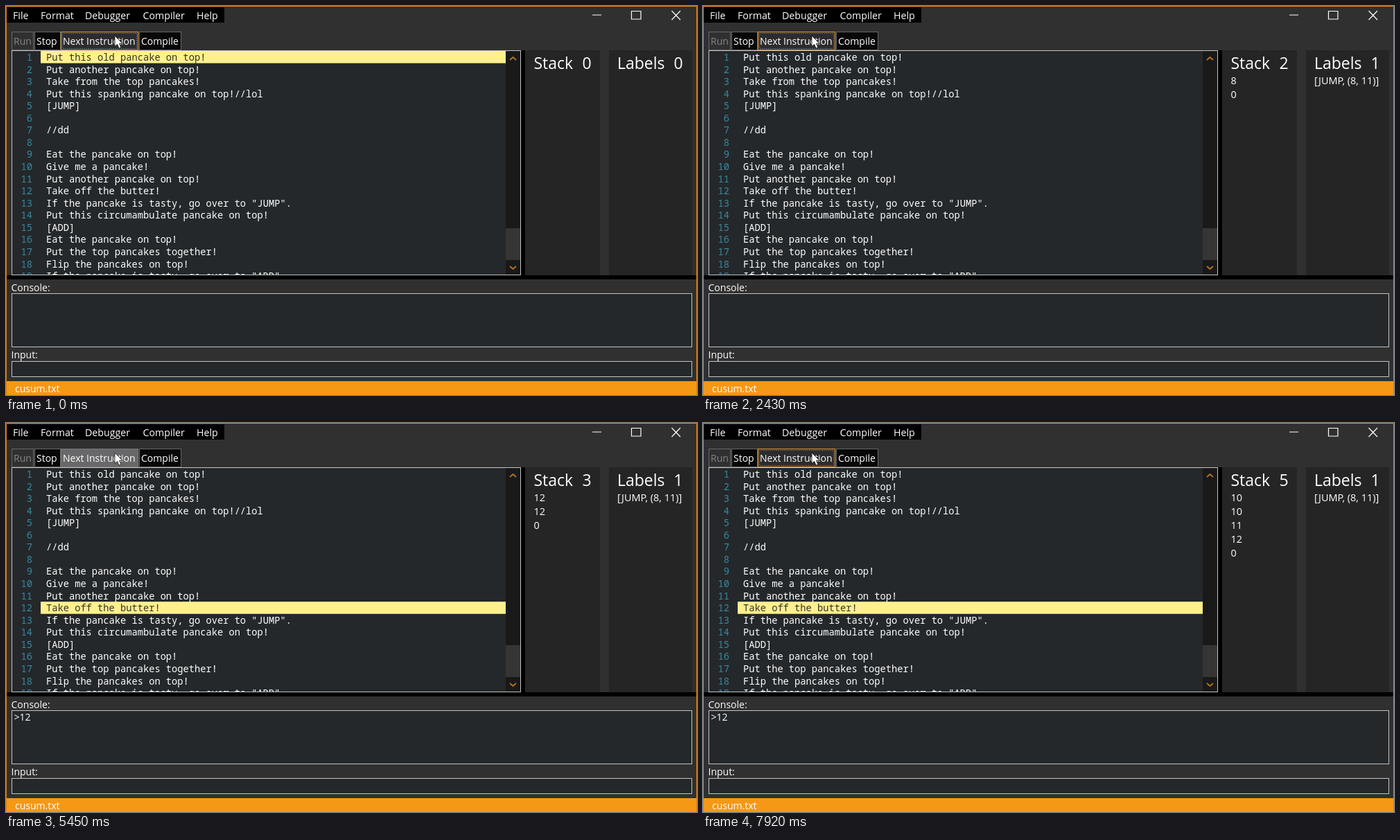
Write an HTML page that moves like this. It is 997 px wide and 562 px high and loops after 8040 ms.

```html
<!DOCTYPE html>
<html lang="en">
<head>
<meta charset="utf-8">
<title>Pancake debugger</title>
<style>
  html, body { margin: 0; width: 100%; height: 100%; overflow: hidden; background: #303030; }
  svg { display: block; width: 997px; height: 562px; }
  text { font: 14px "Open Sans", "Noto Sans", sans-serif; fill: #fff; white-space: pre; }
  .menu text { font-size: 14.2px; }
  .head { font-size: 23px; }
  .label, .wait { font-size: 14.5px; }
  .code text { font: 500 13.72px "Noto Sans Mono", "DejaVu Sans Mono", monospace; }
  .code .num { fill: #3989a0; text-anchor: end; }
  .code .active { fill: #34331f; }
  .box { fill: #24282b; stroke: #c4c4c4; }
  .btn { fill: #080808; stroke: #686868; }
  .orange { fill: #f0951c; }
  .line { fill: none; stroke: #fff; stroke-width: 1.2; }
  .arrow { fill: none; stroke: #b8741d; stroke-width: 1.8; }
</style>
</head>
<body>
<svg viewBox="0 0 997 562">
  <rect width="997" height="562" fill="#303030"/>
  <rect x="1" y="2" width="314" height="22" fill="#000"/>
  <g class="menu">
    <text x="10" y="18.5">File</text>
    <text x="50" y="18.5">Format</text>
    <text x="114" y="18.5">Debugger</text>
    <text x="197.5" y="18.5">Compiler</text>
    <text x="275" y="18.5">Help</text>
  </g>
  <path class="line" d="M846 13H859M902.5 7.5H916V19H902.5ZM960.5 7L973 20M973 7L960.5 20"/>

  <rect class="btn" x="8.5" y="37.5" width="31" height="26" style="fill:#303030"/>
  <rect class="btn" x="41.5" y="37.5" width="37" height="26"/>
  <rect class="btn" x="192.5" y="37.5" width="60" height="26"/>
  <rect id="next" x="79.5" y="37.5" width="111" height="26"/>
  <rect id="focus" x="81.5" y="39.5" width="107" height="22" fill="none" stroke="#aaa" stroke-dasharray="1 2"/>
  <text x="11" y="56" style="fill:#858585">Run</text>
  <text x="44" y="56">Stop</text>
  <text x="82" y="56">Next Instruction</text>
  <text x="195" y="56">Compile</text>

  <rect class="box" x="8.5" y="64.5" width="734" height="324"/>
  <rect id="mark" x="50" width="671" height="17.6" fill="#fff08e"/>
  <clipPath id="view"><rect x="9" y="65" width="733" height="323"/></clipPath>
  <g class="code" id="code" clip-path="url(#view)"></g>
  <rect x="721" y="65" width="21" height="323" fill="#19191a"/>
  <rect x="721" y="321" width="21" height="46" fill="#353536"/>
  <path class="arrow" d="M727 78L731.5 74L736 78M727 376L731.5 380L736 376"/>

  <rect x="743" y="64" width="6" height="325" fill="#000"/>
  <rect x="749" y="64" width="108" height="325" fill="#252525"/>
  <rect x="870" y="64" width="120" height="325" fill="#252525"/>
  <text class="head" x="761.5" y="90.5">Stack</text>
  <text class="head" id="depth" x="831.5" y="90.5"></text>
  <text class="head" x="882" y="90.5">Labels</text>
  <text class="head" id="count" x="963.5" y="90.5"></text>
  <text class="label" id="label" x="882" y="112.5">[JUMP, (8, 11)]</text>
  <g id="stack"></g>

  <rect y="389" width="997" height="6" fill="#000"/>
  <text x="7.5" y="411.5">Console:</text>
  <rect class="box" x="8.5" y="415.5" width="981" height="77"/>
  <text id="output" x="11.5" y="430">&gt;12</text>
  <text x="7.5" y="508.5">Input:</text>
  <text id="wait" class="orange wait" x="58" y="508.5">WAITING FOR INPUT (numeric)</text>
  <rect id="input" class="box" x="8.5" y="513.5" width="981" height="22"/>
  <text id="typed" x="11.5" y="530.5"></text>
  <rect id="caret" y="516" width="1" height="18" fill="#fff"/>

  <rect class="orange" y="542" width="997" height="20" style="fill:#f59815"/>
  <text x="13" y="557.5">cusum.txt</text>
  <path d="M.5 562V.5H996.5V562" fill="none" stroke="#d98516"/>
  <path d="M157 43V58.5L160.6 55.2L163 61L165.8 59.8L163.4 54.2H168Z" fill="#fff" stroke="#111" stroke-width=".8"/>
</svg>
<script>
const LOOP = 8040, PRESS = 130, GAP = 60, TOP = 65, PITCH = 17.56;
const WAIT = 2860, ENTER = 4260, REFOCUS = 5030;
const program = `Put this old pancake on top!
Put another pancake on top!
Take from the top pancakes!
Put this spanking pancake on top!//lol
[JUMP]

//dd

Eat the pancake on top!
Give me a pancake!
Put another pancake on top!
Take off the butter!
If the pancake is tasty, go over to "JUMP".
Put this circumambulate pancake on top!
[ADD]
Eat the pancake on top!
Put the top pancakes together!
Flip the pancakes on top!
If the pancake is tasty, go over to "ADD".`.split('\n');

// Mouse release time, next line, stack from the top down
const steps = [
  [-GAP, 1, ''],
  [390, 2, '3'],
  [780, 3, '3 3'],
  [1170, 4, '0'],
  [1560, 5, '8 0'],
  [1980, 9, '8 0'],
  [2400, 10, '0'],
  [WAIT - GAP, 0, '0'],
  [ENTER - GAP, 11, '12 0'],
  [5160, 12, '12 12 0'],
  [5530, 13, '11 12 0'],
  [5900, 11, '11 12 0'],
  [6280, 12, '11 11 12 0'],
  [6640, 13, '10 11 12 0'],
  [6990, 11, '10 11 12 0'],
  [7320, 12, '10 10 11 12 0']
];
const clicks = steps.map(s => s[0]).filter(t => t > 0 && t !== ENTER - GAP);

const $ = id => document.getElementById(id);
const show = (id, on) => { $(id).style.display = on ? '' : 'none'; };

function addText(parent, x, y, content, cls = '') {
  const el = document.createElementNS('http://www.w3.org/2000/svg', 'text');
  el.setAttribute('x', x);
  el.setAttribute('y', y);
  el.setAttribute('class', cls);
  el.textContent = content;
  parent.append(el);
  return el;
}

const lines = program.map((line, i) => {
  const y = 79 + i * PITCH;
  addText($('code'), 38, y, i + 1, 'num');
  return addText($('code'), 58, y, line);
});
const cells = Array.from({ length: 5 }, (_, i) => addText($('stack'), 761.5, 112.5 + i * 20, '', 'label'));

function draw(t) {
  const [, nextLine, values] = steps.filter(s => s[0] + GAP <= t).pop();
  const stepping = clicks.some(r => t >= r && t < r + GAP);
  const line = stepping ? 0 : nextLine;
  show('mark', line);
  $('mark').setAttribute('y', TOP + (line - 1) * PITCH);
  lines.forEach((el, i) => el.setAttribute('class', i + 1 === line ? 'active' : ''));

  const stack = values ? values.split(' ') : [];
  cells.forEach((el, i) => { el.textContent = stack[i] || ''; });
  $('depth').textContent = stack.length;
  const labelled = t >= 1980 + GAP;
  $('count').textContent = +labelled;
  show('label', labelled);

  const pressed = clicks.some(r => t >= r - PRESS && t < r);
  $('next').style.fill = pressed ? '#68686a' : '#2c2c2e';
  $('next').style.stroke = pressed ? '#777' : '#e29530';
  show('focus', t < WAIT || t >= 6150);

  const editing = t >= WAIT && t < REFOCUS;
  const typed = t < 3480 || t >= ENTER ? '' : t < 3720 ? '1' : '12';
  const lastKey = [WAIT, 3480, 3720, ENTER].filter(k => k <= t).pop() || 0;
  show('wait', t >= WAIT && t < ENTER);
  show('output', t >= ENTER);
  $('input').style.stroke = editing ? '#df8c1e' : '';
  $('typed').textContent = typed;
  $('caret').setAttribute('x', 11 + typed.length * 8);
  show('caret', editing && (t - lastKey) % 1060 < 530);
}

const start = performance.now();
function tick() {
  draw((performance.now() - start) % LOOP);
  requestAnimationFrame(tick);
}
tick();
</script>
</body>
</html>
```
